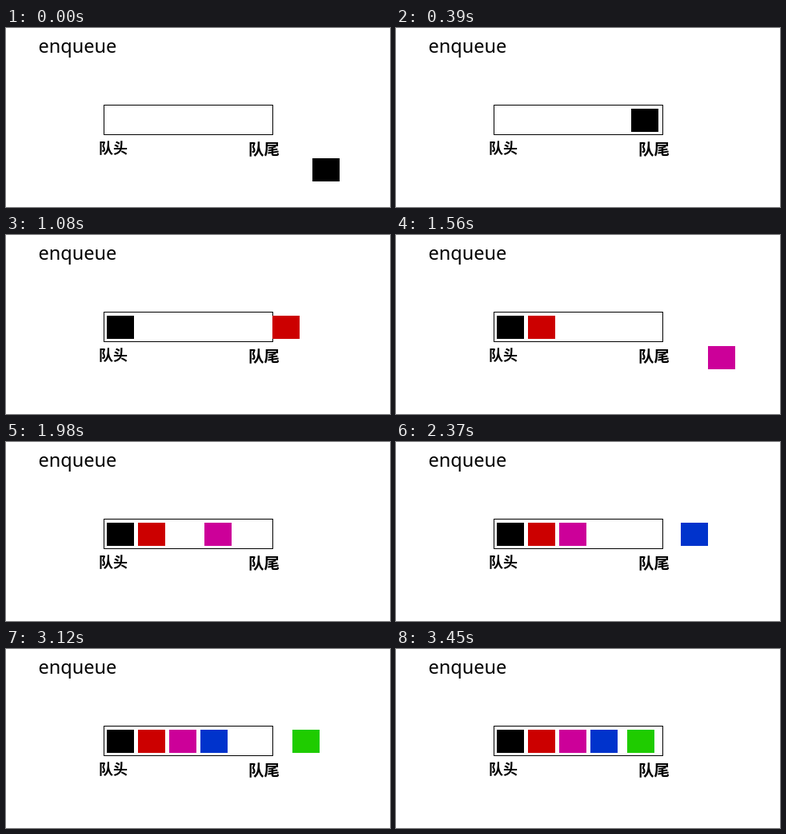
Animation of 480x224 px, one loop 4.62 s. Source, as an HTML page:

```html
<!DOCTYPE html>
<html lang="zh">
<head>
<meta charset="utf-8">
<title>enqueue</title>
<style>
  html, body { margin: 0; width: 100%; height: 100%; overflow: hidden; background: #fff; }
  svg { display: block; width: 480px; height: 224px; }
  .title { font: 500 23.5px "Noto Sans", "Open Sans", sans-serif; }
  .label { font-family: "Noto Sans CJK SC", "Noto Sans CJK", sans-serif; font-weight: 700; }
</style>
</head>
<body>
<svg viewBox="0 0 480 224">
  <text class="title" x="40.5" y="31" textLength="">enqueue</text>
  <rect x="122.5" y="96.5" width="211" height="37" fill="none" stroke="#000"/>
  <text class="label" x="116" y="157" font-size="18">队头</text>
  <text class="label" x="303" y="158.5" font-size="19.5">队尾</text>
</svg>
<script>
const LOOP = 4620, STEP = 30, SPAN = 23, ROW = 101;

// Each item rises from (x, y) to (turn, ROW) in `rise` steps, then slides to `slot`.
const items = [
  { color: '#000', x: 383, y: 163, turn: 360.5, rise: 9, slot: 126 },
  { color: '#c00', x: 422, y: 163, turn: 399.5, rise: 9, slot: 165 },
  { color: '#c09', x: 403, y: 184, turn: 379, rise: 11, slot: 204 },
  { color: '#03c', x: 416, y: 171, turn: 365, rise: 9, slot: 243 },
  { color: '#1fcc00', x: 399, y: 163, turn: 376.5, rise: 9, slot: 289 }
];

const svg = document.querySelector('svg');
document.querySelector('.title').removeAttribute('textLength');

for (const item of items) {
  item.node = document.createElementNS(svg.namespaceURI, 'rect');
  item.node.setAttribute('width', 34);
  item.node.setAttribute('height', 29);
  item.node.setAttribute('fill', item.color);
  svg.append(item.node);
}

const mix = (a, b, k) => Math.round(a + (b - a) * k);

function position({ x, y, turn, rise, slot }, n) {
  if (n < rise) return [mix(x, turn, n / rise), mix(y, ROW, n / rise)];
  return [mix(turn, slot, Math.min(1, (n - rise) / (SPAN - rise))), ROW];
}

function draw(now) {
  const step = Math.floor((now % LOOP) / STEP);
  items.forEach((item, i) => {
    const n = step - i * SPAN;
    const [x, y] = position(item, Math.max(0, n));
    item.node.setAttribute('x', x);
    item.node.setAttribute('y', y);
    item.node.setAttribute('visibility', n < 0 ? 'hidden' : 'visible');
  });
}

const start = performance.now();
function tick() {
  draw(performance.now() - start);
  requestAnimationFrame(tick);
}
tick();
</script>
</body>
</html>
```
